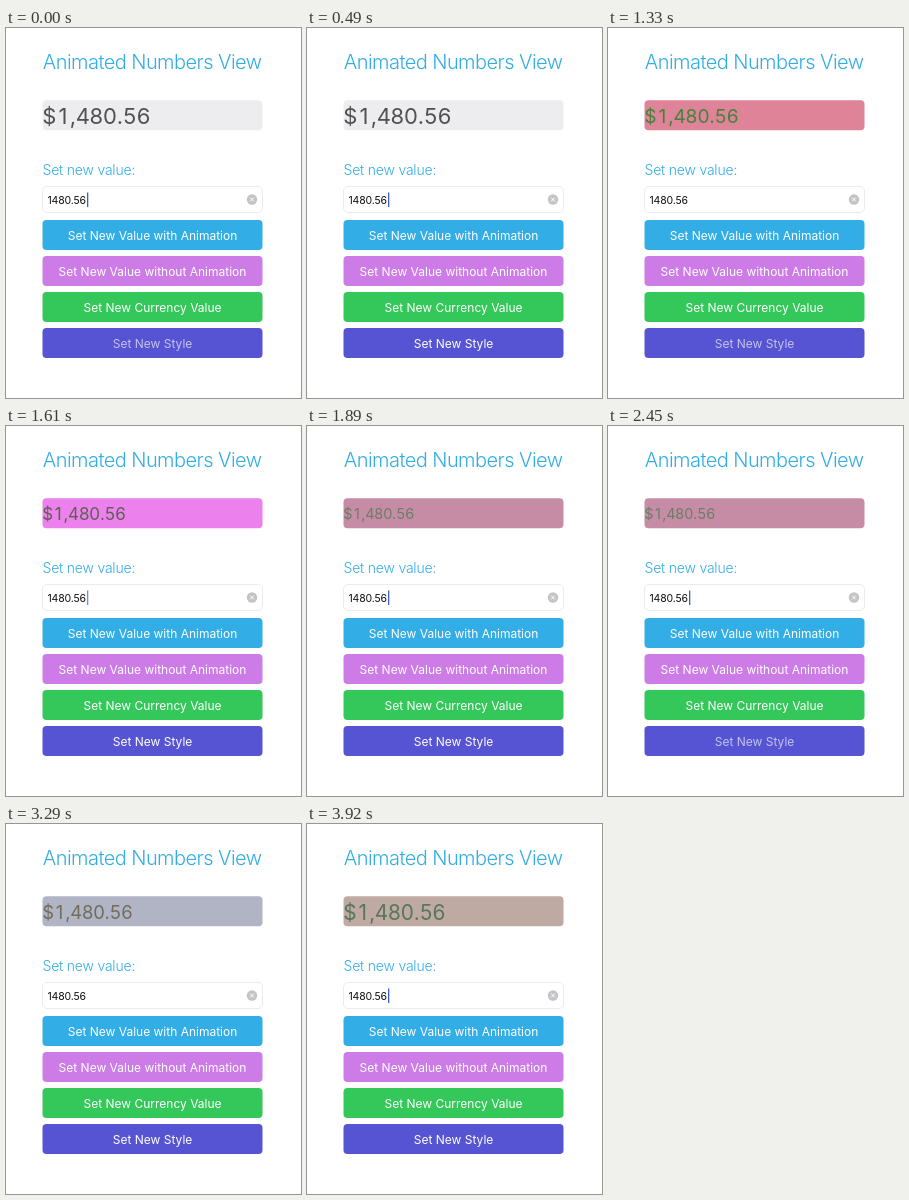
Animation of 295x370 px, one loop 4060 ms. Source, as an HTML page with a canvas:

```html
<!DOCTYPE html>
<html lang="en">
<head>
<meta charset="utf-8">
<title>Animated Numbers View</title>
<style>
  html, body { margin: 0; width: 100%; height: 100%; overflow: hidden; background: #fff; }
  canvas { display: block; width: 295px; height: 370px; }
</style>
</head>
<body>
<canvas id="stage"></canvas>
<script>
const W = 295, H = 370, LOOP = 4060;
const LEFT = 36.5, WIDTH = 220;
const CYAN = '#32ade6';
const canvas = document.getElementById('stage');
const ctx = canvas.getContext('2d');
const dpr = window.devicePixelRatio || 1;
canvas.width = W * dpr;
canvas.height = H * dpr;

const styles = [
  { at: 0,    bg: '#ededf0', ink: '#515153', size: 22 },
  { at: 840,  bg: '#de8398', ink: '#45823a', size: 19.2 },
  { at: 1610, bg: '#ec80ec', ink: '#5c6150', size: 17 },
  { at: 1890, bg: '#c68ca5', ink: '#6a7d69', size: 14.4 },
  { at: 2870, bg: '#d48ca8', ink: '#6d3236', size: 18.4 },
  { at: 3290, bg: '#b0b4c5', ink: '#706e5b', size: 18.4 },
  { at: 3920, bg: '#beaaa2', ink: '#57765b', size: 20.8 }
];

// [start, end] of each tap on the style button
const taps = [[0, 140], [1190, 1610], [1750, 1890], [2450, 2870], [3780, 3920]];

// [time, opacity] steps of the blinking caret
const blink = [
  [0, 1], [280, 0], [490, 1], [1190, 0.5], [1330, 0], [1610, 0.7], [1750, 1],
  [2030, 0.5], [2240, 0], [2450, 1], [3150, 0.5], [3290, 0], [3430, 0.5], [3640, 1]
];

const buttons = [
  ['Set New Value with Animation', CYAN],
  ['Set New Value without Animation', '#cd7ce7'],
  ['Set New Currency Value', '#34c759'],
  ['Set New Style', '#5654d2']
];

function box(y, h, r, fill) {
  ctx.beginPath();
  ctx.roundRect(LEFT, y, WIDTH, h, r);
  ctx.fillStyle = fill;
  ctx.fill();
}

function text(str, x, y, size, color, { weight = 400, spacing = 0, align = 'left' } = {}) {
  ctx.font = `${weight} ${size}px Inter, "Liberation Sans", sans-serif`;
  ctx.letterSpacing = spacing + 'px';
  ctx.textAlign = align;
  ctx.fillStyle = color;
  ctx.fillText(str, x, y);
}

// Each character sits in its own column, digits all equally wide.
function amount(str, { size, ink }) {
  let x = LEFT;
  for (const ch of str) {
    const w = size * (/[,.]/.test(ch) ? 0.28 : 0.62);
    text(ch, x + w / 2, 88 + size * 0.363, size, ink, { align: 'center' });
    x += w;
  }
}

function field(caret) {
  box(158.5, 26, 4.5, '#fff');
  ctx.strokeStyle = '#e6e6e8';
  ctx.lineWidth = 0.8;
  ctx.stroke();
  text('1480.56', 41.5, 175.5, 10.5, '#111', { spacing: -0.15 });

  ctx.globalAlpha = caret;
  ctx.fillStyle = '#3b5fc4';
  ctx.fillRect(81, 164.5, 1.3, 14.5);
  ctx.globalAlpha = 1;

  ctx.beginPath();
  ctx.arc(246, 171.5, 5.2, 0, Math.PI * 2);
  ctx.fillStyle = '#c4c4c7';
  ctx.fill();
  ctx.beginPath();
  for (const s of [-1, 1]) {
    ctx.moveTo(244.1, 171.5 - 1.9 * s);
    ctx.lineTo(247.9, 171.5 + 1.9 * s);
  }
  ctx.strokeStyle = '#fff';
  ctx.lineWidth = 1;
  ctx.stroke();
}

function draw(t) {
  ctx.setTransform(dpr, 0, 0, dpr, 0, 0);
  ctx.fillStyle = '#fff';
  ctx.fillRect(0, 0, W, H);

  text('Animated Numbers View', 36.8, 41, 20, CYAN, { weight: 300, spacing: -0.55 });

  const style = styles.findLast(s => s.at <= t);
  box(72.3, 30, 4, style.bg);
  amount('$1,480.56', style);

  text('Set new value:', 36.5, 147, 14, CYAN, { weight: 300, spacing: -0.2 });
  field(blink.findLast(b => b[0] <= t)[1]);

  const pressed = taps.some(([from, to]) => t >= from && t < to);
  buttons.forEach(([label, color], i) => {
    const y = 192 + i * 36;
    const ink = pressed && i === 3 ? 'rgba(255,255,255,0.65)' : '#fff';
    box(y, 30, 4, color);
    text(label, 146.5, y + 19.5, 12, ink, { align: 'center' });
  });
}

function tick() {
  draw(performance.now() % LOOP);
  requestAnimationFrame(tick);
}
tick();
</script>
</body>
</html>
```
